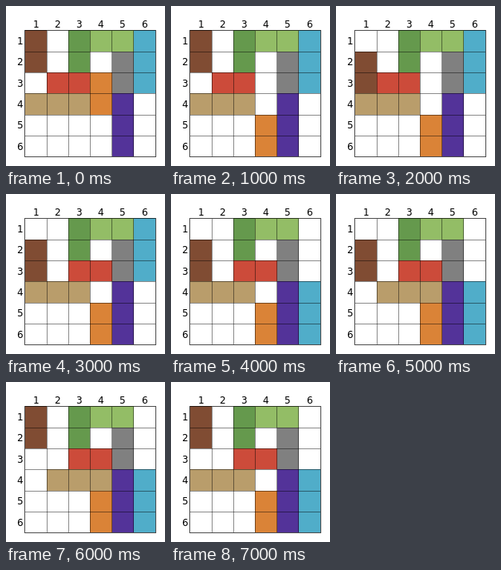
An HTML page that plays this animation: 199 px wide and 200 px high, repeating every 8000 ms.

```html
<!DOCTYPE html>
<html lang="en">
<head>
<meta charset="utf-8">
<title>Sliding blocks</title>
<style>
  html, body { margin: 0; width: 100%; height: 100%; overflow: hidden; background: #fff; }
  svg { display: block; width: 100%; height: 100%; }
  text { font: 12px "DejaVu Sans", sans-serif; fill: #000; }
  #grid path { stroke: #000; stroke-width: 1; opacity: .45; }
</style>
</head>
<body>
<svg viewBox="0 0 199 200">
  <g id="blocks" shape-rendering="crispEdges"></g>
  <g id="grid"></g>
  <rect x="23.5" y="30.5" width="164" height="158" fill="none" stroke="#000" stroke-opacity=".7"/>
  <g id="labels"></g>
</svg>
<script>
const STEP = 1000, LOOP = 8000, N = 6;
const edgeX = i => 23.88 + i * 163.18 / N;
const edgeY = i => 30 + i * 158 / N;
const snapX = i => Math.round(edgeX(i));
const snapY = i => Math.ceil(edgeY(i));

// colour, column, row, columns wide, rows tall
const blocks = {
  brown:  ['#804c33', 0, 0, 1, 2],
  green:  ['#65994d', 2, 0, 1, 2],
  lime:   ['#93bd66', 3, 0, 2, 1],
  cyan:   ['#50adc9', 5, 0, 1, 3],
  gray:   ['#808080', 4, 1, 1, 2],
  red:    ['#cc4b3a', 1, 2, 2, 1],
  orange: ['#da8337', 3, 2, 1, 2],
  tan:    ['#b99d6b', 0, 3, 3, 1],
  purple: ['#533399', 4, 3, 1, 3]
};

// one move per step: block, columns, rows
const moves = [
  ['orange', 0, 2], ['brown', 0, 1], ['red', 1, 0], ['cyan', 0, 3],
  ['tan', 1, 0], ['brown', 0, -1], ['tan', -1, 0]
];

function add(parent, tag, attrs, text) {
  const el = document.createElementNS('http://www.w3.org/2000/svg', tag);
  for (const k in attrs) el.setAttribute(k, attrs[k]);
  if (text) el.textContent = text;
  return document.getElementById(parent).appendChild(el);
}

const rects = {};
for (const name in blocks) rects[name] = add('blocks', 'rect', { fill: blocks[name][0] });

for (let i = 1; i < N; i++) {
  add('grid', 'path', { d: `M${Math.floor(edgeX(i)) + .5} 31V188` });
  add('grid', 'path', { d: `M24 ${snapY(i) + .5}H187` });
}
for (let i = 0; i < N; i++) {
  add('labels', 'text', { x: Math.round(edgeX(i + .5) - 3.8), y: 27 }, i + 1);
  add('labels', 'text', { x: 14, y: Math.round(edgeY(i + .5) + 4.8) }, i + 1);
}

function place(name, col, row) {
  const [, , , w, h] = blocks[name];
  const x = snapX(col), y = snapY(row);
  const r = rects[name];
  r.setAttribute('x', x);
  r.setAttribute('y', y);
  r.setAttribute('width', snapX(col + w) - x);
  r.setAttribute('height', snapY(row + h) - y);
}

function draw(time) {
  const done = moves.slice(0, Math.floor(time % LOOP / STEP));
  for (const name in blocks) {
    let [, col, row] = blocks[name];
    for (const [who, dx, dy] of done) {
      if (who === name) { col += dx; row += dy; }
    }
    place(name, col, row);
  }
}

const start = performance.now();
function tick() {
  draw(performance.now() - start);
  requestAnimationFrame(tick);
}
tick();
</script>
</body>
</html>
```
